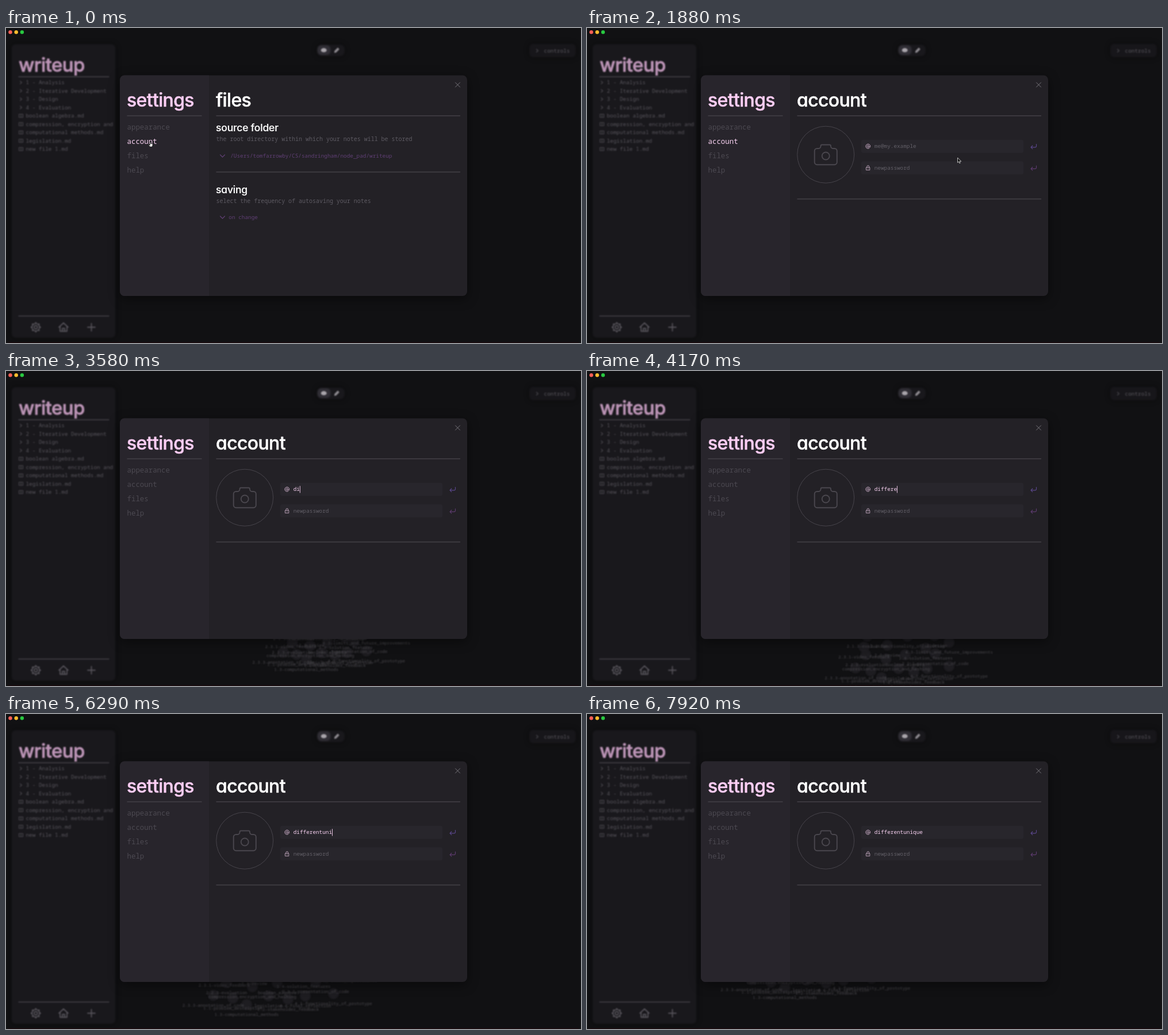
An HTML page with a canvas that plays this animation: 1000 px wide and 549 px high, repeating every 8000 ms.

```html
<!DOCTYPE html>
<html lang="en">
<head>
<meta charset="utf-8">
<title>Settings</title>
<style>
  html, body { margin: 0; width: 100%; height: 100%; overflow: hidden; background: #111113; }
  canvas, svg { position: absolute; left: 0; top: 0; width: 1000px; height: 549px; display: block; }
  text {
    font: 500 32px Inter, Lato, sans-serif;
    font-feature-settings: "cv11";
    letter-spacing: -0.02em;
    fill: #fff; stroke: #fff; stroke-width: .5; stroke-linejoin: round;
  }
  .pink { fill: #fbcdf3; stroke: #fbcdf3; }
  .sub { font-size: 17.5px; letter-spacing: -0.01em; stroke-width: .2; }
</style>
</head>
<body>
<canvas id="stage"></canvas>
<svg viewBox="0 0 1000 549">
  <text class="pink" x="210" y="137">settings</text>
  <g id="filesTitles">
    <text x="365" y="137">files</text>
    <text class="sub" x="365" y="180">source folder</text>
    <text class="sub" x="365" y="288">saving</text>
  </g>
  <g id="accountTitles" style="display:none"><text x="365" y="137">account</text></g>
</svg>
<script>
const W = 1000, H = 549, LOOP = 8000, STEP = 40;
const SWAP = 240, FOCUS = 2580;
const MONO = '"Noto Sans Mono", "DejaVu Sans Mono", monospace';

function setup(canvas, w = W, h = H) {
  canvas.width = w;
  canvas.height = h;
  const c = canvas.getContext('2d');
  c.lineCap = c.lineJoin = 'round';
  return c;
}
const layer = (w, h) => setup(document.createElement('canvas'), w, h);
const ctx = setup(document.getElementById('stage'));

// Copies a finished layer onto another context with a single blur pass.
function blurOnto(c, source, px) {
  c.filter = `blur(${px}px)`;
  c.drawImage(source.canvas, 0, 0);
  c.filter = 'none';
}

function box(c, x, y, w, h, r, color) {
  c.fillStyle = color;
  c.beginPath();
  c.roundRect(x, y, w, h, r);
  c.fill();
}
function dot(c, x, y, r, color) {
  c.fillStyle = color;
  c.beginPath();
  c.arc(x, y, r, 0, 7);
  c.fill();
}
function ring(c, x, y, r, color, width) {
  c.strokeStyle = color;
  c.lineWidth = width;
  c.beginPath();
  c.arc(x, y, r, 0, 7);
  c.stroke();
}
function label(c, str, x, y, size, color, weight = 400, align = 'left') {
  c.font = `${weight} ${size}px ${MONO}`;
  c.textAlign = align;
  c.fillStyle = color;
  c.fillText(str, x, y);
}
// Strokes (and optionally fills) an SVG path moved to x, y.
function shape(c, d, x, y, scale, stroke, width, fill) {
  const p = new Path2D(d);
  c.save();
  c.translate(x, y);
  c.scale(scale, scale);
  c.lineWidth = width / scale;
  c.strokeStyle = stroke;
  if (fill) { c.fillStyle = fill; c.fill(p); }
  c.stroke(p);
  c.restore();
}
const rule = (c, x1, x2, y, color = '#434047') => shape(c, `M${x1} ${y}H${x2}`, 0, 0, 1, color, 1.5);

const ICON = {
  camera: 'M5 7h1a2 2 0 0 0 2-2a1 1 0 0 1 1-1h6a1 1 0 0 1 1 1a2 2 0 0 0 2 2h1a2 2 0 0 1 2 2v9a2 2 0 0 1-2 2H5a2 2 0 0 1-2-2V9a2 2 0 0 1 2-2M15 13a3 3 0 1 1-6 0a3 3 0 1 1 6 0',
  enter: 'M5 -4.5V-1.5A2 2 0 0 1 3 .8H-4.5M-1.7 -2L-4.5 .8L-1.7 3.6',
  at: 'M1.7 0A1.7 1.7 0 1 1 -1.7 0A1.7 1.7 0 1 1 1.7 0V.6A1.1 1.1 0 0 0 3.9 .6V0A3.9 3.9 0 1 0 1.9 3.4',
  lock: 'M-3 -.6H3V4H-3ZM-1.8 -.6V-2.2A1.8 1.8 0 0 1 1.8 -2.2V-.6M0 1.5V1.9',
  chevron: 'M-4 -2L0 2L4 -2',
  close: 'M-4 -4L4 4M4 -4L-4 4',
  right: 'M-1.5 -2.5L1.5 0L-1.5 2.5',
  book: 'M-3.5 -2.7H3.5V2.7H-3.5ZM0 -2.7V2.7',
  home: 'M-8 0L0 -7.5L8 0M-6 -1.5V7H6V-1.5M-2 7V2H2V7',
  plus: 'M-6.5 0H6.5M0 -6.5V6.5',
  pencil: 'M-3.5 3.5L-3 1L2 -4L4 -2L-1 3Z',
  arrow: 'M0 0V8.2L1.9 6.5L3.3 9.4L4.6 8.8L3.3 6H5.8Z',
  hand: 'M-.8 -.6Q0 -1.2 .7 -.5V2.4L3.6 3Q4.4 3.3 4.2 4.6L3.4 8H-.8L-3 4.8Q-3 3.8 -2 4.2L-.8 5.2Z',
  beam: 'M-2.2 -5Q-.4 -5 0 -4Q.4 -5 2.2 -5M0 -4V4M-2.2 5Q-.4 5 0 4Q.4 5 2.2 5M-1.2 .8H1.2'
};

function makeBackdrop() {
  const out = layer(), panels = layer(), details = layer();
  out.fillStyle = '#111113';
  out.fillRect(0, 0, W, H);
  out.fillStyle = '#1a0b0e';
  out.fillRect(4, H - 1.5, W - 8, 1.5);
  ['#ff5f57', '#febc2e', '#28c840'].forEach((color, i) => dot(out, 7.5 + i * 10.2, 7.2, 3.2, color));

  let c = panels;
  c.shadowColor = 'rgba(0,0,0,.5)';
  c.shadowBlur = 8;
  box(c, 9.5, 28, 181, 512, 8, '#19181c');
  box(c, 541, 29, 48, 20, 8, '#19181c');
  box(c, 910, 27.5, 81, 23.5, 7, '#17161a');
  c.shadowColor = 'transparent';
  box(c, 541.5, 30, 23, 17, 7, '#302e35');
  blurOnto(out, panels, 1.8);

  c = details;
  c.fillStyle = '#a9a5ab';
  c.beginPath();
  c.ellipse(552.7, 38.7, 5, 3.6, 0, 0, 7);
  c.fill();
  const dim = '#4b494f', tool = '#58555c', line = '#48464c';
  shape(c, ICON.pencil, 575, 39, 1, '#8d898f', 1.3, '#8d898f');
  shape(c, ICON.right, 924, 39.5, 1, dim, 1.2);
  label(c, 'controls', 935.5, 43, 9.4, '#5c5a60');

  c.font = '500 33px Inter, Lato, sans-serif';
  c.letterSpacing = '-0.66px';
  c.fillStyle = c.strokeStyle = '#bd95b7';
  c.lineWidth = .8;
  c.fillText('writeup', 22, 75.5);
  c.strokeText('writeup', 22, 75.5);
  c.letterSpacing = '0px';

  rule(c, 22, 179, 85, line);
  rule(c, 22, 179, 502, line);
  const entries = ['1 - Analysis', '2 - Iterative Development', '3 - Design', '4 - Evaluation',
    'boolean algebra.md', 'compression, encryption and', 'computational methods.md',
    'legislation.md', 'new file 1.md'];
  entries.forEach((name, i) => {
    const y = 95 + i * 14.5;
    shape(c, i < 4 ? ICON.right : ICON.book, 26, y, 1, dim, 1.1);
    label(c, name, 34.5, y + 3, 9.37, '#59565d');
  });
  ring(c, 51.8, 521.5, 2.8, tool, 1.7);
  ring(c, 51.8, 521.5, 6.5, tool, 1.7);
  for (let i = 0; i < 8; i++) {
    const a = i * Math.PI / 4;
    dot(c, 51.8 + 7.5 * Math.cos(a), 521.5 + 7.5 * Math.sin(a), 1.5, tool);
  }
  shape(c, ICON.home, 100, 521.5, 1, tool, 1.8);
  shape(c, ICON.plus, 148.5, 521.5, 1, tool, 1.8);
  blurOnto(out, details, 1.1);
  return out.canvas;
}

function drawModal(c) {
  c.save();
  c.shadowColor = 'rgba(0,0,0,.45)';
  c.shadowBlur = 20;
  c.shadowOffsetY = 5;
  box(c, 198, 82.5, 604, 384.5, 8, '#232126');
  c.restore();
  box(c, 198, 82.5, 155, 384.5, [8, 0, 0, 8], '#28252c');
  rule(c, 211, 340, 153);
  rule(c, 366, 789.5, 153);
  shape(c, ICON.close, 785.5, 99, 1, '#77747b', 1);
  ['appearance', '', 'files', 'help'].forEach((name, i) =>
    label(c, name, 210.5, 176.5 + i * 25, 12.42, '#4c4951'));
}

function makeFiles() {
  const c = layer(), grey = '#5d5a62', purple = '#5f3f74';
  drawModal(c);
  label(c, 'the root directory within which your notes will be stored', 365.5, 197, 9.98, grey);
  label(c, '/Users/tomfarrowby/CS/sandringham/node_pad/writeup', 390.2, 226.2, 9.38, purple, 500);
  shape(c, ICON.chevron, 376.5, 223, 1, purple, 1.2);
  rule(c, 366, 789.5, 251);
  label(c, 'select the frequency of autosaving your notes', 365.5, 305, 9.98, grey);
  label(c, 'on change', 387.3, 333.3, 9.38, purple);
  shape(c, ICON.chevron, 376.5, 330, 1, purple, 1.2);
  return c.canvas;
}

function makeAccount() {
  const c = layer();
  drawModal(c);
  ring(c, 415.2, 220.7, 49.5, '#47444b', 1);
  shape(c, ICON.camera, 389.2, 194.8, 2.17, '#4a474e', 1.9);
  [195, 232.5].forEach(y => box(c, 477, y, 282, 22.5, 3, '#28262c'));
  shape(c, ICON.at, 488.8, 206.2, 1, '#dcbcd7', .9);
  shape(c, ICON.lock, 488.8, 243.6, 1, '#c3aac0', .9);
  shape(c, ICON.enter, 776.5, 207, 1, '#594689', 1.2);
  shape(c, ICON.enter, 776.5, 244.5, 1, '#5c3a6d', 1.2);
  rule(c, 366, 789.5, 298);
  label(c, 'newpassword', 499.7, 247, 9.37, '#625f67');
  return c.canvas;
}

// Interpolates through rows of [time, ...values].
function track(rows, t, ease = k => k) {
  if (t <= rows[0][0]) return rows[0].slice(1);
  const i = rows.findIndex(r => r[0] > t);
  if (i < 0) return rows[rows.length - 1].slice(1);
  const a = rows[i - 1], b = rows[i], k = ease((t - a[0]) / (b[0] - a[0]));
  return a.slice(1).map((v, j) => v + (b[j + 1] - v) * k);
}

const NODES = [
  ['2.3.3-annotation_of_code', 399, 527],
  ['1.1-problem_description', 433, 532],
  ['1.3-computational_methods', 457, 543],
  ['1.2-stakeholder_feedback', 529, 534],
  ['4.4-final_reflection', 559, 528],
  ['4.1-functionality_of_prototype', 608, 524],
  ['legislation', 495, 528],
  ['2.1.1-presentation_of_code', 577, 503],
  ['1.4-solution_features', 556, 494],
  ['4.3-limits_and_future_improvements', 608, 484],
  ['2.2.3-evaluation', 422, 505],
  ['2.3.1-video_feedback', 418, 492],
  ['compression,encryption_and_hashing', 467, 512],
  ['boolean_algebra', 510, 505],
  ['3.2-functionality_of_solution', 515, 474],
  ['2.1.3-evaluation', 425, 474],
  ['2.2-design', 575, 473],
  ['2.3-review', 470, 489]
];
// time, anchor x, anchor y, spread x, spread y
const DRIFT = [
  [2580, 535, 452, .55, .4],
  [2920, 533, 478, .6, .5],
  [4170, 512, 535, .78, 1.05],
  [5420, 457, 527, 1, 1],
  [6290, 418, 507, 1, 1],
  [7920, 344, 480, 1, .85]
];

// A small picture, drawn around its centre and blurred once.
function sprite(w, h, px, draw) {
  const sharp = layer(w, h), soft = layer(w, h);
  sharp.translate(w / 2, h / 2);
  draw(sharp);
  blurOnto(soft, sharp, px);
  return soft.canvas;
}
const place = (s, x, y) => ctx.drawImage(s, x - s.width / 2, y - s.height / 2);

const nodeSprite = sprite(30, 30, 1.1, c => dot(c, 0, 0, 9.5, '#1e1d21'));
const labelSprites = NODES.map(([name]) =>
  sprite(170, 18, .8, c => label(c, name, 0, 2.5, 7.47, '#4d4b50', 400, 'center')));

function paintGraph(t) {
  if (t < FOCUS) return;
  const [ax, ay, sx, sy] = track(DRIFT, t);
  const spots = NODES.map(([, x, y]) => [ax + sx * (x - 457), ay + sy * (y - 527)]);
  spots.forEach(([x, y]) => place(nodeSprite, x, y - 17));
  spots.forEach(([x, y], i) => place(labelSprites[i], x, y));
}

const KEYS = [3420, 3540, 3660, 3780, 3900, 4020, 4130, 4300, 4500, 5980, 6110, 6230, 6600, 6760, 6960];
const PINK = '#f9d2f2';

function paintEmail(t) {
  const count = KEYS.filter(k => k <= t).length;
  if (count) label(ctx, 'differentunique'.slice(0, count), 499.7, 209.4, 9.37, PINK, 500);
  else label(ctx, 'me@my.example', 499.7, 209.4, 9.37, '#625f67');

  const last = count ? KEYS[count - 1] : FOCUS;
  if (t >= FOCUS && (t - last) % 1000 < 500) {
    ctx.fillStyle = PINK;
    ctx.fillRect(499.6 + count * 5.62, 200.3, .9, 12.2);
  }
}

const POINTER = [
  [920, 251, 199], [1200, 636.6, 227.3], [1450, 655, 229], [1750, 655, 229], [2350, 568, 207.3]
];

function paintPointer(t) {
  if (t >= KEYS[0]) return;
  const [x, y] = track(POINTER, t, k => k * k * (3 - 2 * k));
  const inField = x > 477 && x < 759 && ((y > 195 && y < 217.5) || (y > 232.5 && y < 255));
  if (inField) {
    shape(ctx, ICON.beam, x, y, 1, '#111', 2.2);
    shape(ctx, ICON.beam, x, y, 1, '#eee', .9);
  } else if (x < 290) {
    shape(ctx, ICON.hand, x, y, 1, '#111', .8, '#fff');
  } else {
    shape(ctx, ICON.arrow, x, y, 1, '#ddd', .8, '#111');
  }
}

const backdrop = makeBackdrop(), filesPage = makeFiles(), accountPage = makeAccount();
const show = (id, on) => { document.getElementById(id).style.display = on ? '' : 'none'; };
let drawnAt = -1, onAccount = false;

function paint(t) {
  const account = t >= SWAP;
  ctx.drawImage(backdrop, 0, 0);
  paintGraph(t);
  ctx.drawImage(account ? accountPage : filesPage, 0, 0);
  label(ctx, 'account', 210.5, 201.5, 12.42, t < FOCUS ? PINK : '#4c4951');
  if (account) paintEmail(t);
  paintPointer(t);
  if (account !== onAccount) {
    onAccount = account;
    show('filesTitles', !account);
    show('accountTitles', account);
  }
}

function frame(now) {
  const t = Math.floor(now % LOOP / STEP) * STEP;
  if (t !== drawnAt) paint(drawnAt = t);
  requestAnimationFrame(frame);
}
frame(performance.now());
</script>
</body>
</html>
```
